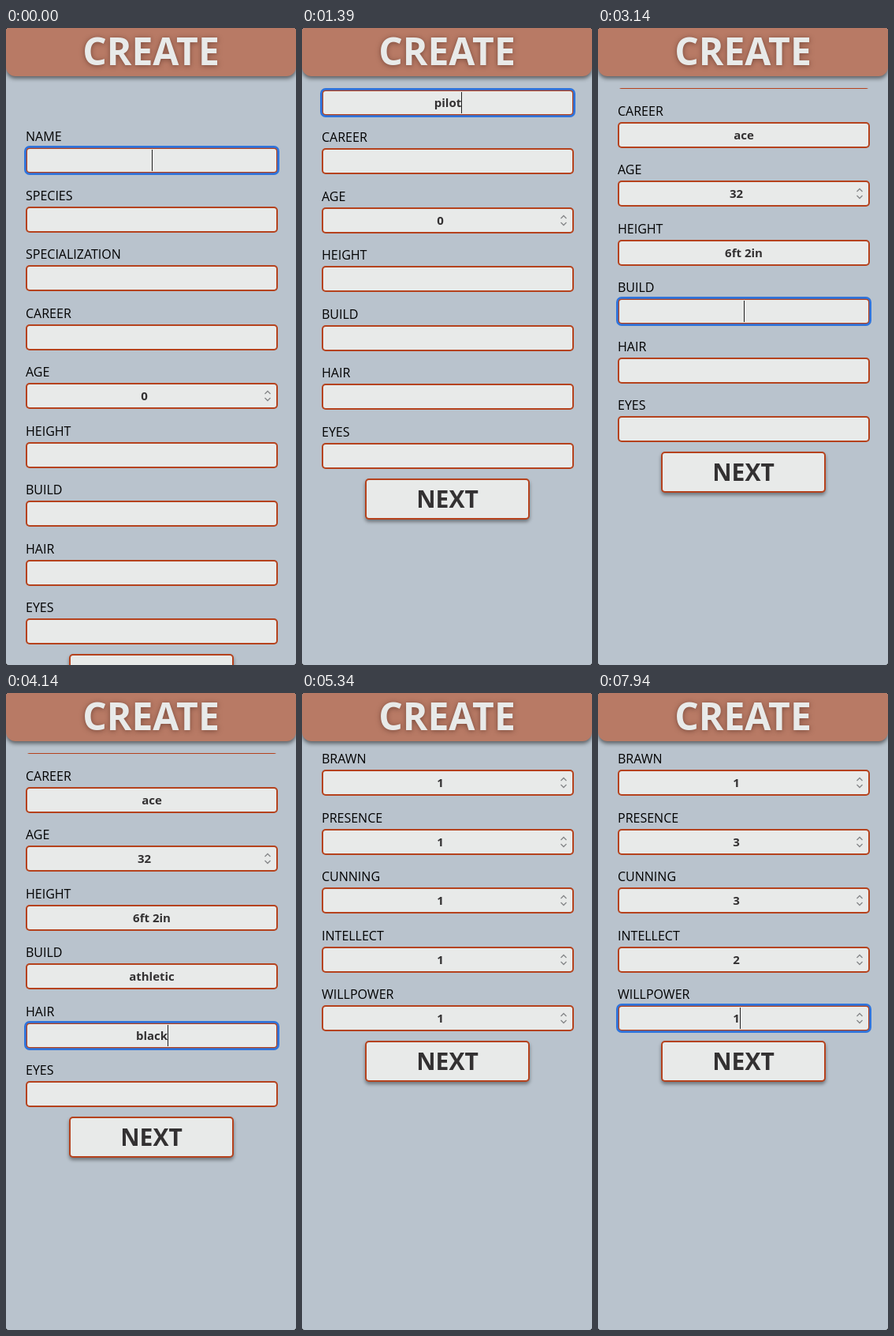
An HTML page with a canvas for the animation above (8000 ms loop, 368 by 806 pixels).

```html
<!DOCTYPE html>
<html lang="en">
<head>
<meta charset="utf-8">
<title>Character form</title>
<style>
  html, body { margin: 0; width: 100%; height: 100%; overflow: hidden; background: #000; }
  canvas { display: block; }
</style>
</head>
<body>
<canvas id="stage" width="368" height="806"></canvas>
<script>
const ctx = document.getElementById('stage').getContext('2d');
const LOOP = 8000, PITCH = 74.5, MAX_SCROLL = 256, PAGE_TURN = 5140;
const FONT = '"Open Sans", "Noto Sans", sans-serif';
const COLOR = { page: '#b9c3cd', header: '#b87a65', paper: '#e8eae9', border: '#b5421d', ring: '#2f74dc', ink: '#333132' };

const pages = [
  { top: 151, labels: ['NAME', 'SPECIES', 'SPECIALIZATION', 'CAREER', 'AGE', 'HEIGHT', 'BUILD', 'HAIR', 'EYES'] },
  { top: 97, labels: ['BRAWN', 'PRESENCE', 'CUNNING', 'INTELLECT', 'WILLPOWER'] }
];
const initialValues = [['', '', '', '', '0', '', '', '', ''], ['1', '1', '1', '1', '1']];

// Each event gives a field focus and, optionally, a new value.
const events = [];
const set = (time, page, field, value) => events.push({ time, page, field, value });
const type = (time, page, field, text, gap) =>
  [...text].forEach((_, i) => set(time + i * gap, page, field, text.slice(0, i + 1)));

set(0, 0, 0);
type(40, 0, 0, 'tamrin', 80);
set(540, 0, 1);
type(600, 0, 1, 'human', 60);
set(1040, 0, 2);
type(1090, 0, 2, 'pilot', 70);
set(1480, 0, 3);
type(1560, 0, 3, 'ace', 80);
set(1990, 0, 4);
set(2140, 0, 4, '');
type(2260, 0, 4, '32', 80);
set(2440, 0, 5);
type(2500, 0, 5, '6ft 2in', 70);
set(3140, 0, 6);
type(3290, 0, 6, 'athletic', 65);
set(3840, 0, 7);
type(3900, 0, 7, 'black', 60);
set(4290, 0, 8);
type(4440, 0, 8, 'green', 80);
set(PAGE_TURN, 1, -1);
set(5990, 1, 0);
set(6140, 1, 1);
set(6240, 1, 1, '');
set(6390, 1, 1, '3');
set(6540, 1, 2);
set(6590, 1, 2, '');
set(6890, 1, 2, '3');
set(7140, 1, 3);
set(7440, 1, 3, '');
set(7740, 1, 3, '2');
set(7940, 1, 4);

function stateAt(time) {
  const values = initialValues.map(list => [...list]);
  let page = 0, focus = 0;
  for (const e of events) {
    if (e.time > time) break;
    page = e.page;
    focus = e.field;
    if (e.value !== undefined) values[page][focus] = e.value;
  }
  const scroll = page || !focus ? 0 : Math.min(MAX_SCROLL, PITCH * focus + 73.5);
  return { page, focus, scroll, values: values[page] };
}

function shadow(color, y, blur) {
  ctx.shadowColor = color;
  ctx.shadowOffsetY = y;
  ctx.shadowBlur = blur;
}

function rounded(x, y, w, h, radius) {
  ctx.beginPath();
  ctx.roundRect(x, y, w, h, radius);
}

function text(string, x, y, font, color, align = 'center') {
  ctx.font = `${font} ${FONT}`;
  ctx.fillStyle = color;
  ctx.textAlign = align;
  ctx.fillText(string, x, y);
}

function box(x, y, w, h) {
  ctx.fillStyle = COLOR.border;
  rounded(x, y, w, h, 5);
  ctx.fill();
  shadow('transparent', 0, 0);
  ctx.fillStyle = COLOR.paper;
  rounded(x + 2, y + 2, w - 4, h - 4, 3);
  ctx.fill();
}

function spinner(y) {
  ctx.strokeStyle = '#858789';
  ctx.lineWidth = 1.3;
  ctx.beginPath();
  for (const [end, tip] of [[14, 10.5], [19, 22.5]]) {
    ctx.moveTo(328.5, y + end);
    ctx.lineTo(332, y + tip);
    ctx.lineTo(335.5, y + end);
  }
  ctx.stroke();
}

function drawField(label, value, y, numeric, focused) {
  const center = numeric ? 175.5 : 185;
  text(label, 25, y - 8, '400 16px', '#000', 'left');
  box(25, y, 320, 33);
  text(value, center, y + 22, '700 15px', COLOR.ink);
  if (focused) {
    const caret = Math.round(center + ctx.measureText(value).width / 2);
    ctx.fillStyle = '#222';
    ctx.fillRect(caret, y + 3, 1, 27);
    ctx.strokeStyle = COLOR.ring;
    ctx.lineWidth = 2.8;
    rounded(24.4, y - 0.6, 321.2, 34.2, 5.5);
    ctx.stroke();
  }
  if (numeric) spinner(y);
}

function drawHeader() {
  ctx.save();
  shadow('rgba(0,0,0,.5)', 3, 5);
  ctx.fillStyle = COLOR.header;
  rounded(0, 0, 368, 61, [3, 3, 12, 12]);
  ctx.fill();
  shadow('rgba(70,35,25,.55)', 1, 6);
  text('CREATE', 184, 47, '700 48px', COLOR.paper);
  ctx.restore();
}

function draw(time) {
  const { page, focus, scroll, values } = stateAt(time);
  const { top, labels } = pages[page];
  const rowY = i => Math.round(top + PITCH * i - scroll);

  ctx.clearRect(0, 0, 368, 806);
  ctx.save();
  rounded(0, 0, 368, 806, 3);
  ctx.clip();
  ctx.fillStyle = COLOR.page;
  ctx.fillRect(0, 0, 368, 806);

  ctx.save();
  ctx.beginPath();
  ctx.rect(0, 76, 368, 730);
  ctx.clip();
  labels.forEach((label, i) =>
    drawField(label, values[i], rowY(i), page === 1 || label === 'AGE', i === focus));
  const nextY = rowY(labels.length - 1) + 45;
  shadow('rgba(0,0,0,.4)', 3, 4);
  box(80, nextY, 209, 52);
  text('NEXT', 184.5, nextY + 37, '700 30px', COLOR.ink);
  ctx.restore();

  drawHeader();
  ctx.restore();
}

function frame() {
  draw(performance.now() % LOOP);
  requestAnimationFrame(frame);
}
frame();
</script>
</body>
</html>
```
